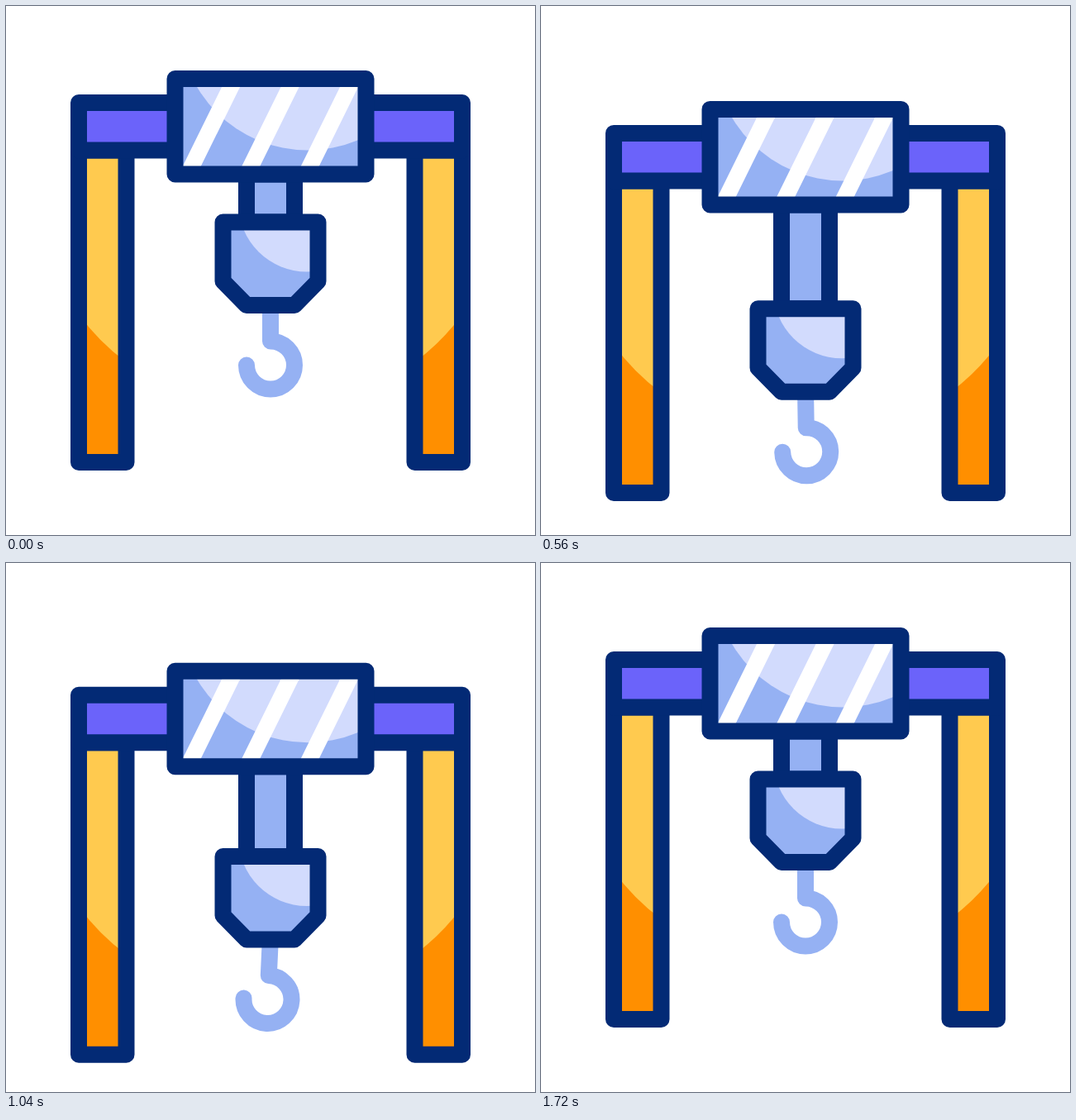
Write an HTML page that moves like this. It is 640 by 640 pixels and loops after 1800 ms.

```html
<!DOCTYPE html>
<html lang="en">
<head>
<meta charset="utf-8">
<title>Gantry crane</title>
<style>
  html, body { margin: 0; height: 100%; overflow: hidden; background: #fff; }
  svg { display: block; width: 100vw; height: 100vh; }
  .line { fill: none; stroke: #032a75; stroke-width: 20; stroke-linejoin: round; }
  .blue { fill: #95b1f3; }
  .light { fill: #d2dbfd; }
</style>
</head>
<body>
<svg viewBox="0 0 640 640">
  <defs>
    <clipPath id="panel"><rect x="205" y="88" width="230" height="115"/></clipPath>
    <clipPath id="shell"><path d="M262.5 261.5h115V333L349 362h-58l-28.5-29z"/></clipPath>
    <g id="leg">
      <path fill="#ff8f00" d="M88 174.5h57.5V552H88z"/>
      <path fill="#ffca4f" d="M88 174.5h57.5V431Q112 406 88 373z"/>
      <path class="line" d="M88 174.5h57.5V552H88z"/>
    </g>
  </defs>

  <g id="block">
    <path id="hook" fill="none" stroke="#95b1f3" stroke-width="20" stroke-linecap="round" stroke-linejoin="round"
      d="M320 358V405.5A29 29 0 1 1 291 434.5"/>
  </g>
  <g id="cable">
    <path id="rope" class="line blue" style="fill:#95b1f3"/>
  </g>
  <g id="housing">
    <g clip-path="url(#shell)">
      <rect class="blue" x="262" y="261" width="116" height="102"/>
      <circle class="light" cx="364" cy="238.7" r="82.8"/>
    </g>
    <path class="line" d="M262.5 261.5h115V333L349 362h-58l-28.5-29z"/>
  </g>

  <g id="gantry">
    <use href="#leg"/>
    <use href="#leg" transform="matrix(-1 0 0 1 640 0)"/>
    <path class="line" style="fill:#6b63fa" d="M88 117H552V174.5H88z"/>
    <g clip-path="url(#panel)">
      <rect class="blue" x="204" y="88" width="232" height="116"/>
      <circle class="light" cx="365" cy="18.9" r="155.6"/>
      <path fill="#fff" d="M266 88h22l-57 115.5h-22zM337.5 88h22l-57 115.5h-22zM409 88h22l-57 115.5h-22z"/>
    </g>
    <path class="line" d="M204.5 88h231V203.5h-231z"/>
  </g>
</svg>
<script>
const LOOP = 1800;
const el = id => document.getElementById(id);
const clamp = v => Math.min(1, Math.max(0, v));
const smooth = s => s * s * (3 - 2 * s);

// cubic-bezier(.615, 0, .385, 1), solved by bisection
function ease(x) {
  let lo = 0, hi = 1;
  for (let i = 0; i < 24; i++) {
    const s = (lo + hi) / 2, r = 1 - s;
    if (3 * r * r * s * 0.615 + 3 * r * s * s * 0.385 + s ** 3 < x) lo = s; else hi = s;
  }
  return smooth(lo);
}

const ramp = (t, from, to) => ease(clamp((t - from) / (to - from)));

// Damped swing of the hook: [time, degrees]
const swing = [[0, 0], [350, 15.4], [700, -9.6], [1050, 2.65], [1400, -1], [1720, 0]];
function swingAngle(t) {
  const i = swing.findIndex(([time]) => time > t);
  if (i < 0) return 0;
  const [t0, a0] = swing[i - 1], [t1, a1] = swing[i];
  return a0 + (a1 - a0) * smooth((t - t0) / (t1 - t0));
}

function draw(t) {
  const sink = 46 * (ramp(t, 48, 848) - ramp(t, 834, 1694));
  const lower = 69.5 * (ramp(t, 0, 660) - ramp(t, 787, 1420));
  const move = (id, y) => el(id).setAttribute("transform", `translate(0 ${y})`);
  move("gantry", sink);
  move("cable", sink);
  move("block", sink + lower);
  move("housing", sink + lower);
  el("rope").setAttribute("d", `M291 203.5h58V${261.5 + lower}h-58z`);
  el("hook").setAttribute("transform", `rotate(${swingAngle(t)} 320 358)`);
}

function tick() {
  draw(performance.now() % LOOP);
  requestAnimationFrame(tick);
}
tick();
</script>
</body>
</html>
```
